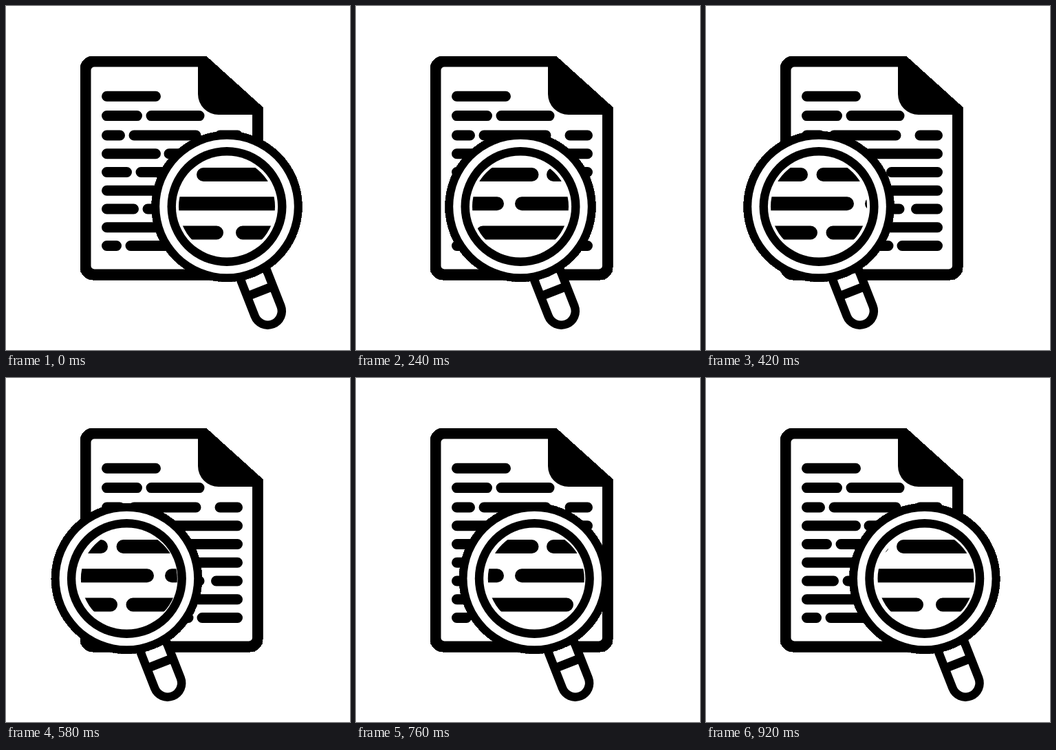
An HTML page that plays this animation: 500 by 500 pixels, repeating every 0.94 s.

```html
<!DOCTYPE html>
<html lang="en">
<head>
<meta charset="utf-8">
<title>Document search</title>
<style>
  html, body { margin: 0; width: 100%; height: 100%; overflow: hidden; background: #fff; }
  svg { display: block; width: 100%; height: 100%; }
  .bars { fill: none; stroke: #000; stroke-linecap: round; }
  .hard { stroke: #000; stroke-width: .8; shape-rendering: crispEdges; }
</style>
</head>
<body>
<svg viewBox="0 0 500 500">
  <clipPath id="view"><circle id="viewCircle" cy="291.5" r="70"/></clipPath>

  <path class="hard" d="M126 73H291L373 147V380a18 18 0 0 1-18 18H126a18 18 0 0 1-18-18V91a18 18 0 0 1 18-18z"/>
  <path fill="#fff" d="M128.5 88.5H279V128a30 30 0 0 0 30 30H358V377.5a5 5 0 0 1-5 5H128.5a5 5 0 0 1-5-5V93.5a5 5 0 0 1 5-5z"/>
  <path id="text" class="bars" stroke-width="15"/>

  <g id="lens">
    <g transform="rotate(-21.4)" stroke-linecap="round">
      <path d="M0 100V163.2" stroke="#000" stroke-width="53"/>
      <path d="M0 112V163.2" stroke="#fff" stroke-width="28"/>
      <path d="M-20 132.3H20" stroke="#000" stroke-width="13" stroke-linecap="butt"/>
    </g>
    <circle class="hard" r="109.4"/>
    <circle r="97.8" fill="#fff"/>
    <circle r="86.5"/>
    <circle r="74.1" fill="#fff"/>
  </g>
  <g clip-path="url(#view)"><path id="zoomed" class="bars" stroke-width="20"/></g>
</svg>
<script>
const $ = id => document.getElementById(id);

// Bars flow from the left with a fixed gap; the last one of a justified row ends at the right margin.
function barRow(y, widths, { left, right, gap, radius }, justified) {
  let x = left;
  return widths.map((width, i) => {
    if (justified && i === widths.length - 1) x = right - width;
    const bar = `M${x + radius} ${y}H${x + width - radius}`;
    x += width + gap;
    return bar;
  }).join('');
}

const page = { left: 139, right: 344, gap: 5.5, radius: 7.5 };
const pageRows = [[86], [59, 85], [34, 105, 40.5], [86, 114.5], [44, 67, 82], [205], [54, 90, 46], [205], [29, 99, 66.5]];
const pageY = i => 188 + (i - 2) * (i < 2 ? 28.4 : 26.75);
$('text').setAttribute('d', pageRows.map((row, i) => barRow(pageY(i), row, page, i > 1)).join(''));

const zoom = { left: 60, right: 420, gap: 12.5, radius: 10 };
const zoomRows = [[88, 105, 143], [155, 189], [102, 141.5, 86]];
$('zoomed').setAttribute('d', zoomRows.map((row, i) => barRow(245 + 42.25 * i, row, zoom, true)).join(''));

const LOOP = 940, STEP = 20, SWEEP = 480, RIGHT = 321, LEFT = 157;
const smooth = s => s * s * (3 - 2 * s);

function draw(now) {
  const t = Math.floor(now % LOOP / STEP) * STEP;
  const e = smooth(t % SWEEP / SWEEP);
  const returning = t >= SWEEP;
  const x = RIGHT + (LEFT - RIGHT) * (returning ? 1 - e : e);
  // The magnified view runs slightly ahead of the rim on the way back.
  const lead = returning ? 3.7 - 2 * e : 0;
  $('lens').setAttribute('transform', `translate(${x} 291.5)`);
  $('viewCircle').setAttribute('cx', x + lead);
}

const start = performance.now();
(function frame() {
  draw(performance.now() - start);
  requestAnimationFrame(frame);
})();
</script>
</body>
</html>
```
